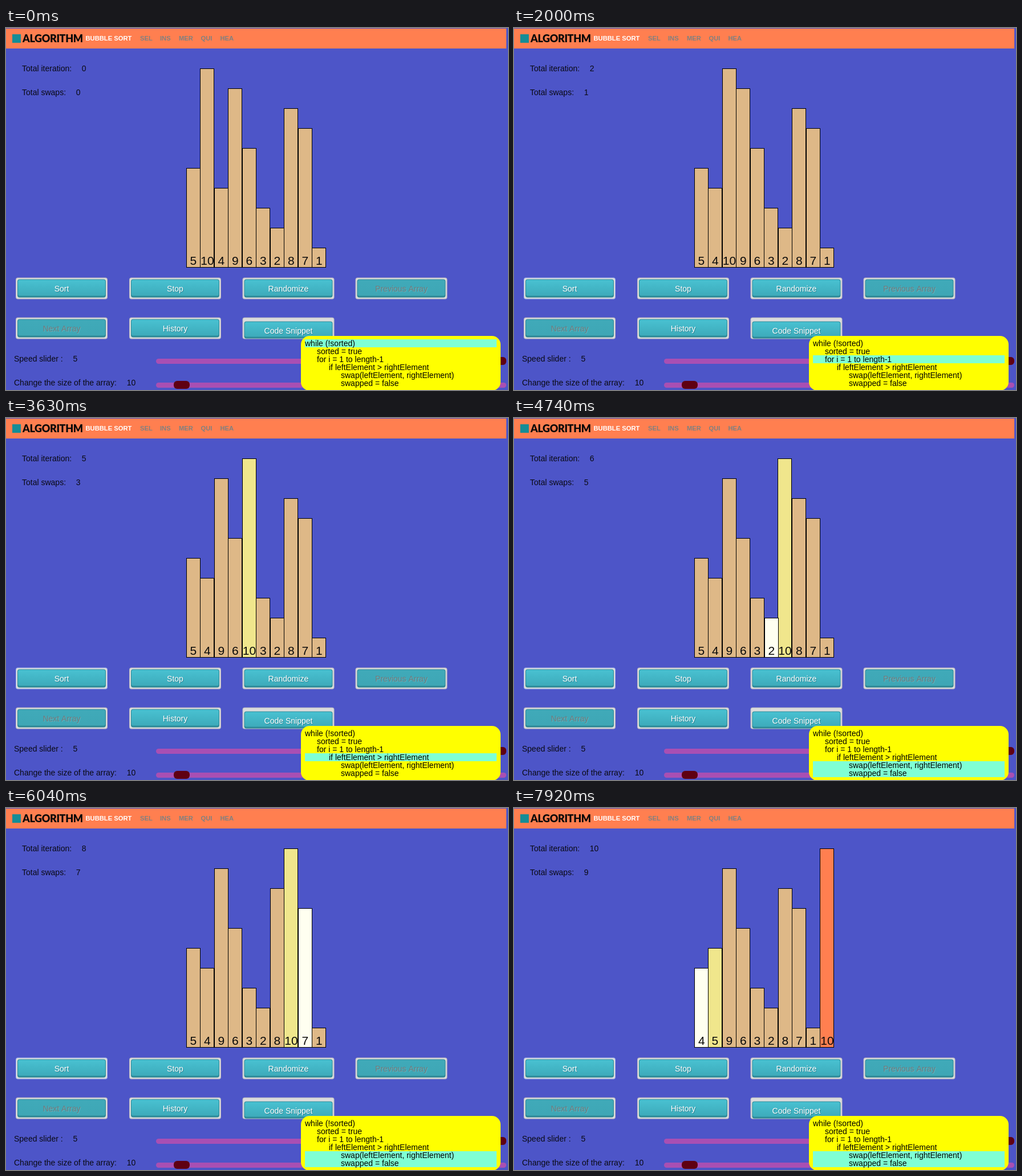
These frames come from a looping animation (880x636 px, 7990 ms). An HTML page with a canvas:

```html
<!DOCTYPE html>
<html lang="en">
<head>
<meta charset="utf-8">
<title>Bubble sort</title>
<style>
  html, body { margin: 0; width: 100%; height: 100%; overflow: hidden; background: #4d55c8; }
  canvas { display: block; }
</style>
</head>
<body>
<canvas id="stage" width="880" height="636"></canvas>
<script>
const ctx = document.getElementById('stage').getContext('2d');
const LOOP = 7990;
const SANS = '"Liberation Sans", Arial, sans-serif';
const START = [5, 10, 4, 9, 6, 3, 2, 8, 7, 1];
const PITCH = 24.5, LEFT = 316, FLOOR = 421, UNIT = 35;
const TAN = '#deb887', KHAKI = '#f0e68c', IVORY = '#fffff0', CORAL = '#ff7f50';

// When each round of the inner loop begins; the last one opens the second pass.
const ROUNDS = [880, 1245, 1990, 2735, 3480, 4215, 4960, 5695, 6430, 7395];
const PASS_TWO = 7165, LINE_TIME = 120;
const IF_AT = 140, PAIR_AT = 220, SWAP_AT = 320, STEP = 67;
const SHIFT = [0, 7.5, 16, 24];

const CODE = [
  [0, 'while (!sorted)'], [1, 'sorted = true'], [1, 'for i = 1 to length-1'],
  [2, 'if leftElement > rightElement'], [3, 'swap(leftElement, rightElement)'],
  [3, 'swapped = false']
];

function text(str, x, y, color = '#0a0a14', font = '14px ' + SANS, align = 'left') {
  ctx.font = font;
  ctx.fillStyle = color;
  ctx.textAlign = align;
  ctx.fillText(str, x, y);
}

function box(x, y, w, h, r, fill) {
  ctx.fillStyle = fill;
  ctx.beginPath();
  ctx.roundRect(x, y, w, h, r);
  ctx.fill();
}

// State of the sort at time t.
function stateAt(t) {
  const s = { arr: START.slice(), lines: [0], iters: 0, swaps: 0, left: -1, right: -1, shift: 0, done: 10 };
  if (t >= ROUNDS[0] - LINE_TIME) s.lines = [1];
  ROUNDS.forEach((begin, n) => {
    if (t < begin) return;
    const i = n % 9, e = t - begin;
    const end = n < 9 ? (n === 8 ? PASS_TWO : ROUNDS[n + 1]) : LOOP;
    const over = t >= end;
    const swaps = s.arr[i] > s.arr[i + 1];
    s.lines = [2];
    s.left = s.right = -1;
    if (e >= IF_AT) {
      s.iters++;
      s.lines = [3];
      s.left = i;
    }
    if (e >= PAIR_AT) s.right = i + 1;
    if (swaps && e >= SWAP_AT) {
      s.swaps++;
      s.lines = [4, 5];
      s.shift = SHIFT[Math.min(3, Math.floor((e - SWAP_AT) / STEP))];
    }
    if (over) {
      if (swaps) [s.arr[i], s.arr[i + 1]] = [s.arr[i + 1], s.arr[i]];
      s.left = s.right = -1;
      s.shift = 0;
    }
  });
  if (t >= PASS_TWO) {
    s.done = 9;
    if (t < ROUNDS[9]) s.lines = [t < PASS_TWO + LINE_TIME ? 0 : 1];
  }
  return s;
}

function bar(value, x, fill) {
  const px = Math.floor(x), top = FLOOR - value * UNIT;
  ctx.fillStyle = '#000';
  ctx.fillRect(px, top, 25, FLOOR - top);
  ctx.fillStyle = fill;
  ctx.fillRect(px + 1, top + 1, 23, FLOOR - top - 2);
  text(value, x + 12.4, 416, '#0a0a0a', '21px ' + SANS, 'center');
}

function bars(s) {
  const draw = i => {
    let x = LEFT + i * PITCH, fill = i >= s.done ? CORAL : TAN;
    if (i === s.left) { x += s.shift; fill = KHAKI; }
    if (i === s.right) { x -= s.shift; fill = IVORY; }
    bar(s.arr[i], x, fill);
  };
  s.arr.forEach((v, i) => { if (i !== s.right) draw(i); });
  if (s.right >= 0) draw(s.right);
}

function button(label, x, y, { disabled = false, down = 0, focus = false } = {}) {
  box(x, y, 161, 38, 4, focus ? '#9cb4ea' : '#b9b9c0');
  box(x + 1, y + 1, 159, 36, 3, '#dcdcdc');
  const top = y + 3 + down, h = 32 - down / 2;
  box(x + 3, top, 155, h, 4, disabled ? '#2e8795' : '#2d8a98');
  const g = ctx.createLinearGradient(0, top, 0, top + h);
  g.addColorStop(0, disabled ? '#40aab9' : '#49c2d2');
  g.addColorStop(1, disabled ? '#3ea6b5' : '#3ca8b8');
  box(x + 4, top + 1, 153, h - 4, 3, g);
  const cx = x + 80.5, ty = y + 24 + down;
  text(label, cx + 1, ty + 1, disabled ? '#5fb4c0' : '#2f8795', undefined, 'center');
  text(label, cx, ty, disabled ? '#717b7d' : '#fff', undefined, 'center');
}

function nav() {
  ctx.fillStyle = CORAL;
  ctx.fillRect(0, 1, 877, 35);
  ctx.fillStyle = '#168c96';
  ctx.fillRect(11, 11, 15, 15);
  ctx.letterSpacing = '-0.4px';
  text('ALGORITHM', 29, 25, '#0a0a0a', '900 18px Lato, sans-serif');
  ctx.letterSpacing = '0px';
  const font = 'bold 11.2px ' + SANS;
  text('BUBBLE SORT', 139.5, 22, '#fff', font);
  [['SEL', 235], ['INS', 270], ['MER', 303], ['QUI', 341.5], ['HEA', 375.5]]
    .forEach(([name, x]) => text(name, x, 22, '#808080', font));
}

function slider(label, value, valueX, y, thumbX) {
  text(label, 14, y, undefined);
  text(value, valueX, y);
  box(263, y - 5, 614, 9, 4.5, '#a94fb3');
  box(thumbX, y - 8, 28, 14, 6, '#5f0013');
}

function snippet(lines) {
  box(517, 541, 350, 96, 15, '#ff0');
  ctx.fillStyle = '#7fffd4';
  lines.forEach(n => ctx.fillRect(524, 547 + n * 14, 336, 14));
  CODE.forEach(([depth, str], n) => text(str, 524 + depth * 21, 559 + n * 14, '#000'));
}

function draw(t) {
  const s = stateAt(t);
  ctx.fillStyle = '#4d55c8';
  ctx.fillRect(0, 0, 880, 636);
  nav();
  text('Total iteration:', 28, 76);
  text(s.iters, 132.7, 76);
  text('Total swaps:', 28, 118);
  text(s.swaps, 122.7, 118);
  bars(s);
  button('Sort', 17, 438.5, { focus: t >= 210, down: t >= 210 && t < 360 ? 4 : 0 });
  button('Stop', 216, 438.5);
  button('Randomize', 414.5, 438.5);
  button('Previous Array', 612.5, 438.5, { disabled: true });
  button('Next Array', 17, 508.5, { disabled: true });
  button('History', 216, 508.5);
  button('Code Snippet', 414.5, 508.5, { down: 4 });
  slider('Speed slider :', '5', 117.5, 586, 849);
  slider('Change the size of the array:', '10', 211.8, 628, 294);
  snippet(s.lines);
}

const origin = performance.now();
function tick() {
  draw((performance.now() - origin) % LOOP);
  requestAnimationFrame(tick);
}
tick();
</script>
</body>
</html>
```
